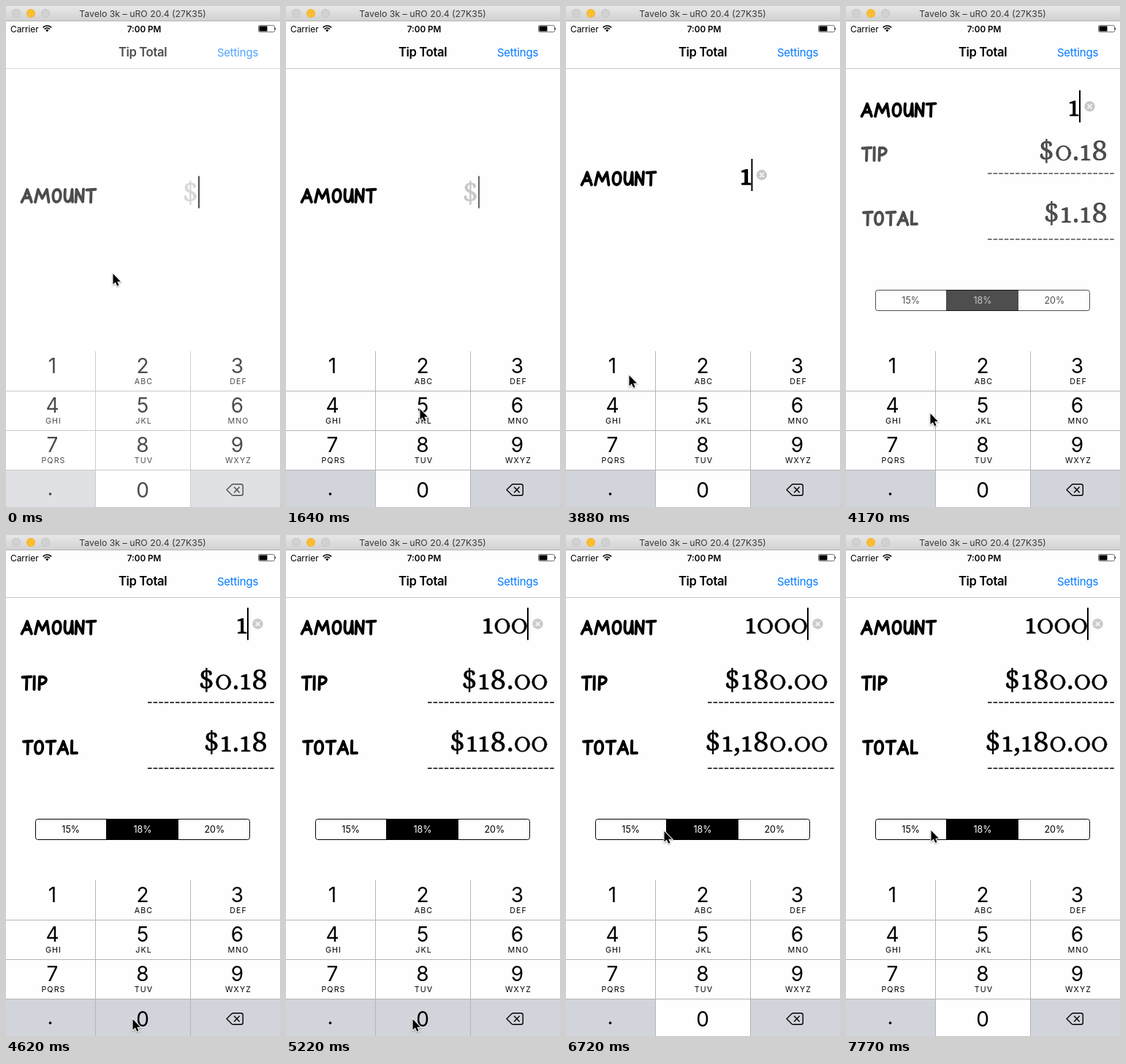
An HTML page with a canvas for the animation above (8000 ms loop, 375 by 685 pixels).

```html
<!DOCTYPE html>
<html lang="en">
<head>
<meta charset="utf-8">
<title>Tip Total</title>
<style>
  html, body { margin: 0; width: 100%; height: 100%; overflow: hidden; background: #fefefe; }
  canvas { display: block; width: 375px; height: 685px; }
</style>
</head>
<body>
<canvas id="stage" role="img" aria-label="Tip calculator: amount, tip, total"></canvas>
<script>
const W = 375, H = 685, LOOP = 8000;
const SANS = 'Inter, "Open Sans", sans-serif';
const SERIF = '"Noto Serif", serif';
const KEY_GRAY = '#d1d4da', LINE_GRAY = '#b3b4b7', PAPER = '#fefefe';
const canvas = document.getElementById('stage');
const c = canvas.getContext('2d');
const dpr = window.devicePixelRatio || 1;
canvas.width = W * dpr;
canvas.height = H * dpr;

const ANCHORS = [0, 740, 3280, 4020];
const STEP = 150;
function snap(t) {
  const a = ANCHORS.filter(v => v <= t).pop();
  return a + STEP * Math.floor((t - a) / STEP);
}

const clamp = v => Math.max(0, Math.min(1, v));
const mix = (a, b, p) => a + (b - a) * p;
const smooth = v => { const p = clamp(v); return p * p * (3 - 2 * p); };

function rect(x, y, w, h, color) {
  c.fillStyle = color;
  c.fillRect(x, y, w, h);
}

function disc(x, y, r, color) {
  c.fillStyle = color;
  c.beginPath();
  c.arc(x, y, r, 0, Math.PI * 2);
  c.fill();
}

function text(str, x, y, size, { color = '#000', weight = 400, align = 'center', track = 0, family = SANS } = {}) {
  c.font = `${weight} ${size}px ${family}`;
  c.letterSpacing = track + 'px';
  c.textAlign = align;
  c.fillStyle = color;
  c.fillText(str, x, y);
  c.letterSpacing = '0px';
}

function faded(alpha, draw) {
  if (alpha <= 0) return;
  c.save();
  c.globalAlpha = alpha;
  draw();
  c.restore();
}

function at(x, y, draw) {
  c.save();
  c.translate(x, y);
  draw();
  c.restore();
}

// Hand-lettered labels: [advance, stroke path], 20 px tall
const MARKER = {
  A: [18.5, 'M2 19.5Q7 11 9.5 2.5L15.5 19.5M5 14L14 13.5'],
  M: [24, 'M2 19.5L6 2.5L11.5 14.5L18 2.5L20.5 19.5'],
  O: [16.5, 'M8 2.5C1 2.5 .5 19 7 19.3C14 19.5 15 3 8 2.5'],
  U: [15, 'M2.5 2.5C1.5 12 1.5 19 6 19C10 19 11.5 10 12 2.5L12.5 19.3'],
  N: [15.5, 'M2 19.5L3 2.5L11.5 19L12.5 2'],
  T: [15, 'M1.5 3L13.5 2.2M7.5 3L7 19.7'],
  I: [7, 'M2.8 2L2.5 19.5'],
  P: [14, 'M3 2.5L2.5 19.5M3 3C15 0 14.5 12 3.5 12.5'],
  L: [11, 'M2.7 2L2.3 18.8L9.5 18.5']
};
for (const k in MARKER) MARKER[k][1] = new Path2D(MARKER[k][1]);

function label(word, x, y) {
  c.strokeStyle = '#000';
  c.lineWidth = 3.9;
  c.lineCap = c.lineJoin = 'round';
  for (const ch of word) {
    const [advance, path] = MARKER[ch];
    at(x, y, () => c.stroke(path));
    x += advance;
  }
}

// Old-style figures: short 0 and 1, other signs from the serif font
const EM = 38;
const ADVANCE = { '$': .61, '0': .614, '1': .429, '8': .596, '.': .27, ',': .27 };
const ONE = new Path2D('M2.6-18.4L8.5-20.4H10.3V-2.2L14.6-1.3V0H2.6V-1.3L6.8-2.2V-17L2.6-17.1Z');
const ZERO = new Path2D();
ZERO.ellipse(11.7, -9.9, 10.2, 10.3, 0, 0, Math.PI * 2);
ZERO.closePath();
ZERO.ellipse(11.7, -9.9, 6.9, 9.1, 0, 0, Math.PI * 2);

function figures(str, right, base, color = '#000', bold = false) {
  const width = ch => ADVANCE[ch] * EM;
  let x = right - [...str].reduce((sum, ch) => sum + width(ch), 0);
  c.strokeStyle = color;
  c.lineJoin = 'round';
  for (const ch of str) {
    const w = width(ch);
    c.lineWidth = bold ? 1.3 : .5;
    if (ch === '0' || ch === '1') {
      at(x, base, () => {
        const shape = ch === '0' ? ZERO : ONE;
        c.fillStyle = color;
        c.fill(shape, 'evenodd');
        c.stroke(shape);
      });
    } else {
      text(ch, x + w / 2, base, EM, { color, family: SERIF });
      c.strokeText(ch, x + w / 2, base);
    }
    x += w;
  }
}

const money = v => '$' + v.toLocaleString('en-US', { minimumFractionDigits: 2, maximumFractionDigits: 2 });

function windowBar() {
  const g = c.createLinearGradient(0, 0, 0, 20);
  g.addColorStop(0, '#e9e8e9');
  g.addColorStop(1, '#d2d1d2');
  rect(0, 0, W, 20, g);
  rect(0, 20, W, 1, '#b9b8b9');
  [[14, '#d2d1d2', '#c1c0c1'], [34, '#fdbd2e', '#f0b02c'], [54, '#d2d1d2', '#c1c0c1']].forEach(([x, fill, edge]) => {
    disc(x, 10, 6, edge);
    disc(x, 10, 5.3, fill);
  });
  text('Tavelo 3k – uRO 20.4 (27K35)', 187, 15, 12.3, { color: '#383838' });
}

function statusBar() {
  text('Carrier', 6, 35.5, 12, { align: 'left', track: -.1 });
  text('7:00 PM', 189, 35.5, 11.7, { weight: 600 });
  c.strokeStyle = '#000';
  c.lineCap = 'butt';
  c.lineWidth = 1.7;
  for (const r of [8, 5]) {
    c.beginPath();
    c.arc(56.3, 35, r, -Math.PI * .76, -Math.PI * .24);
    c.stroke();
  }
  c.fillStyle = '#000';
  c.beginPath();
  c.moveTo(56.3, 35.5);
  c.arc(56.3, 35, 2.8, -Math.PI * .76, -Math.PI * .24);
  c.fill();
  c.strokeStyle = '#555';
  c.lineWidth = .8;
  c.beginPath();
  c.roundRect(345.5, 26.5, 22, 9, 1.8);
  c.stroke();
  rect(346.5, 27.5, 11, 7, '#000');
  rect(368, 29.5, 1.3, 3, '#555');
}

function navBar() {
  text('Tip Total', 187, 69, 16.7, { weight: 600, track: -.4 });
  text('Settings', 317, 68.5, 15, { color: '#007aff', track: -.2 });
  rect(0, 85, W, 1, '#c8c8c8');
}

const COLS = [63.5, 187, 316.5];
const LETTERS = ['', 'ABC', 'DEF', 'GHI', 'JKL', 'MNO', 'PQRS', 'TUV', 'WXYZ'];

function deleteIcon() {
  c.strokeStyle = '#000';
  c.lineWidth = 1.4;
  c.lineCap = c.lineJoin = 'round';
  c.stroke(new Path2D('M302 661.5L309 654.6Q310 653.7 311.5 653.7H321.5Q324.3 653.7 324.3 656.5V666.5Q324.3 669.3 321.5 669.3H311.5Q310 669.3 309 668.4Z'));
  c.stroke(new Path2D('M312.5 658L319.3 665M319.3 658L312.5 665'));
}

function keypad(t) {
  rect(0, 634, 122, 51, KEY_GRAY);
  rect(253, 634, 122, 51, KEY_GRAY);
  faded(pressed(t, [[3580, 3730]]), () => rect(0, 472, 122, 54, KEY_GRAY));
  faded(pressed(t, [[4620, 4770], [4920, 5070], [5220, 5520]]), () => rect(123, 634, 129, 51, KEY_GRAY));
  for (const y of [526, 580, 634]) rect(0, y, W, 1, LINE_GRAY);
  for (const x of [122, 252]) rect(x, 472, 1, 213, LINE_GRAY);
  LETTERS.forEach((letters, i) => {
    const x = COLS[i % 3], y = 502 + 54 * Math.floor(i / 3);
    text(String(i + 1), x, y, 28);
    text(letters, x + 1.5, y + 15, 10.7, { track: 1.1 });
  });
  text('0', 187, 671.5, 28);
  text('.', 60.5, 668.5, 28);
  deleteIcon();
}

// Full while held, half for one step after release
function pressed(t, spans) {
  for (const [from, to] of spans) {
    if (t >= from && t < to) return 1;
    if (t >= to && t < to + STEP) return .5;
  }
  return 0;
}

function dashes(y) {
  c.strokeStyle = '#000';
  c.lineWidth = 1.6;
  c.lineCap = 'butt';
  c.setLineDash([5.6, 2]);
  c.beginPath();
  c.moveTo(194, y);
  c.lineTo(367, y);
  c.stroke();
  c.setLineDash([]);
}

function segments() {
  rect(137, 388, 99, 29, '#000');
  c.strokeStyle = '#000';
  c.lineWidth = 1;
  c.beginPath();
  c.roundRect(40.5, 388.5, 293, 28, 3);
  c.stroke();
  ['15%', '18%', '20%'].forEach((s, i) =>
    text(s, 88.7 + 98.3 * i, 407, 12.5, { color: i === 1 ? '#fff' : '#000' }));
}

function results(amount) {
  label('TIP', 21, 191.5);
  label('TOTAL', 22.5, 279.5);
  figures(money(amount * .18), 358.5, 211);
  figures(money(amount * 1.18), 358.5, 296);
  dashes(229);
  dashes(319);
  segments();
}

function clearButton(x, y) {
  disc(x, y, 7.2, '#c9c9cb');
  c.strokeStyle = '#fff';
  c.lineWidth = 1.5;
  c.lineCap = 'round';
  at(x, y, () => c.stroke(new Path2D('M-2.5-2.5L2.5 2.5M2.5-2.5L-2.5 2.5')));
}

function caretAlpha(t) {
  const start = t < 3580 ? 590 : 6115;
  if (t < start || (t >= 3580 && t < 6115)) return 1;
  const u = (t - start) % 1045;
  if (u < 140) return .6;
  if (u < 440) return 0;
  return u < 590 ? .6 : 1;
}

const ENTRIES = [[0, 0], [3730, 1], [4770, 10], [5070, 100], [5520, 1000]];

function amountField(t, amount) {
  const p = smooth((t - 3730) / 560);
  const dy = 133 * (1 - p);
  const end = amount ? mix(238, 331, p) : 264;
  label('AMOUNT', 19.5, 115.5 + dy);
  if (amount) {
    figures(String(amount), end, 134.5 + dy, '#000', t < 4170);
    clearButton(end + 13.5, 121.5 + dy);
  } else {
    figures('$', end, 134.5 + dy, '#c7c7ca');
  }
  faded(caretAlpha(t), () => rect(end - 1, 99.5 + dy, 2, 44, '#000'));
}

const POINTER = [
  [0, 146.5, 366], [450, 146.5, 366], [600, 163, 450], [740, 178.5, 517],
  [890, 178.5, 517], [1340, 183.5, 551], [1640, 183.5, 551], [2390, 86.5, 505],
  [4020, 86.5, 505], [4470, 173.5, 662], [5970, 173.5, 662], [6120, 182, 570],
  [6270, 176, 443], [6420, 176, 443], [6720, 134.5, 405], [6870, 124, 404],
  [7320, 116.5, 404], [LOOP, 116.5, 404]
];
const ARROW = new Path2D('M0 0V14.6L3.4 11.6L5.7 16.8L8 15.8L5.8 10.7H10.4Z');

function pointer(t) {
  const i = POINTER.findIndex(k => k[0] > t);
  const [t0, x0, y0] = POINTER[i - 1], [t1, x1, y1] = POINTER[i];
  const p = (t - t0) / (t1 - t0);
  at(mix(x0, x1, p), mix(y0, y1, p), () => {
    c.shadowColor = 'rgba(0,0,0,.35)';
    c.shadowBlur = 2 * dpr;
    c.shadowOffsetY = dpr;
    c.strokeStyle = '#fff';
    c.lineJoin = 'miter';
    c.lineWidth = 2;
    c.stroke(ARROW);
    c.shadowColor = 'transparent';
    c.fillStyle = '#000';
    c.fill(ARROW);
  });
}

function draw(time) {
  const t = snap(time);
  const amount = ENTRIES.filter(e => e[0] <= t).pop()[1];
  c.setTransform(dpr, 0, 0, dpr, 0, 0);
  rect(0, 0, W, H, PAPER);
  windowBar();
  statusBar();
  navBar();
  amountField(t, amount);
  faded(clamp((t - 3880) / 420), () => results(amount));
  keypad(t);
  // The last of a closing screen fades away.
  faded(t < 150 ? .3 : t < 300 ? .12 : 0, () => rect(0, 41, W, H - 41, '#fff'));
  pointer(t);
}

const began = performance.now();
function tick() {
  draw((performance.now() - began) % LOOP);
  requestAnimationFrame(tick);
}
tick();
</script>
</body>
</html>
```
